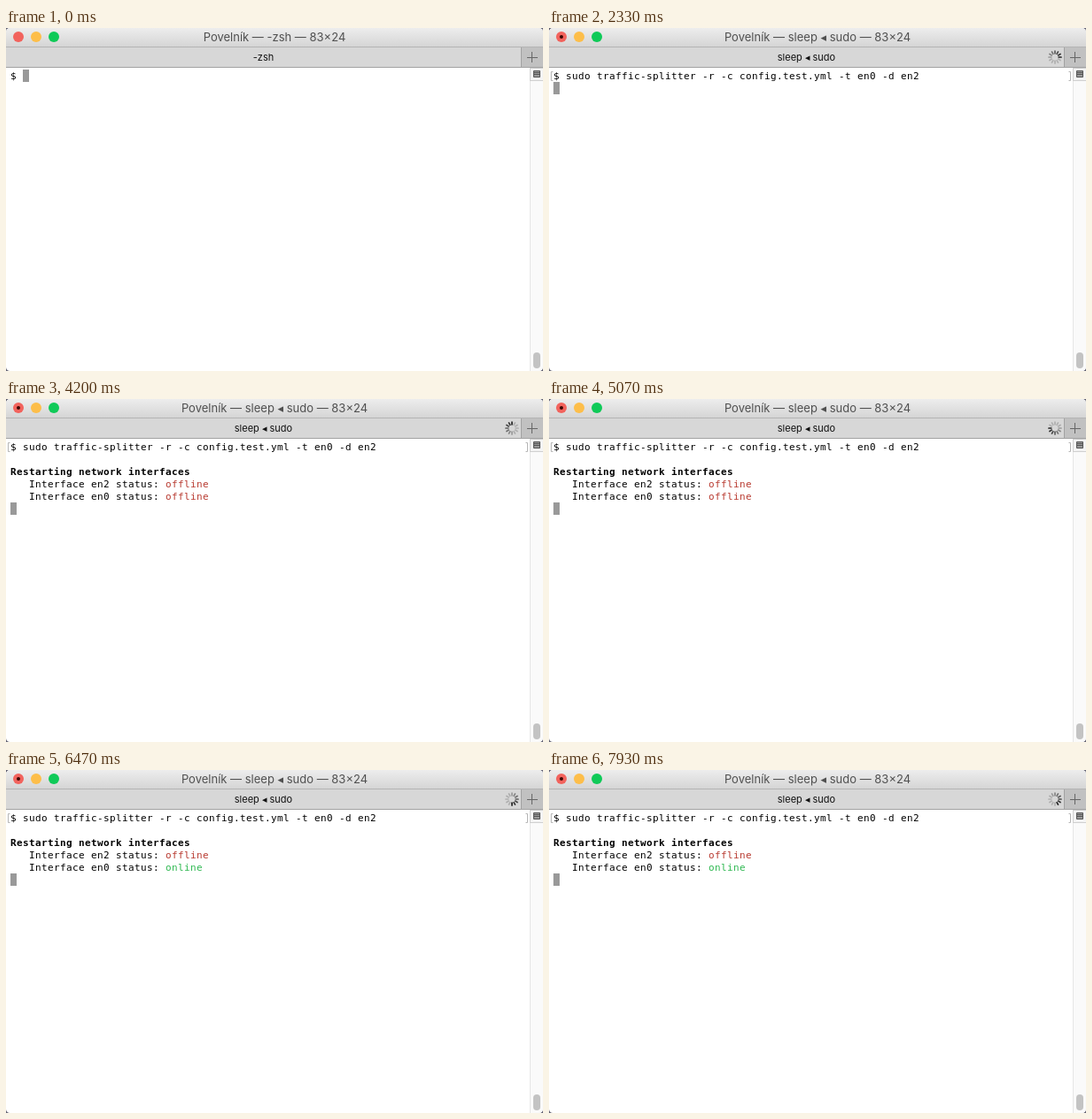
An HTML page for the animation above (8 s loop, 606 by 388 pixels).

```html
<!DOCTYPE html>
<html lang="cs">
<head>
<meta charset="utf-8">
<style>
  html, body { margin: 0; width: 100%; height: 100%; overflow: hidden; background: #667; }
  svg { display: block; }
  text { white-space: pre; }
  .ui { font-family: Inter, "DejaVu Sans", sans-serif; text-anchor: middle; }
  .term { font: 11px "DejaVu Sans Mono", monospace; letter-spacing: .378px; }
  .bold { font-weight: bold; }
</style>
</head>
<body>
<svg width="606" height="388" viewBox="0 0 606 388">
  <defs>
    <linearGradient id="bar" x2="0" y2="1">
      <stop stop-color="#ededed"/><stop offset="1" stop-color="#d4d4d4"/>
    </linearGradient>
    <clipPath id="window"><rect width="606" height="388" rx="4.5"/></clipPath>
  </defs>
  <g clip-path="url(#window)">
    <rect width="606" height="388" fill="#fff"/>

    <rect width="606" height="22" fill="url(#bar)"/>
    <rect y="21" width="606" height="1" fill="#b4b4b4"/>
    <circle cx="14" cy="10" r="6" fill="#f2635d"/>
    <circle cx="34" cy="10" r="6" fill="#fdbe4a"/>
    <circle cx="54" cy="10" r="6" fill="#0fca58"/>
    <circle id="busy" cx="14" cy="10" r="2" fill="#3c0805"/>
    <text id="title" class="ui" x="303" y="15" font-size="13" fill="#505050"></text>

    <rect y="22" width="606" height="22" fill="#d7d7d7"/>
    <rect x="581" y="22" width="25" height="22" fill="#c1c1c1"/>
    <path d="M581.5 22V44M0 44.5H606" stroke="#a2a2a2"/>
    <path d="M588 33.5H600M593.5 27V39" stroke="#666"/>
    <text id="tab" class="ui" x="290.5" y="37" font-size="11" fill="#111"></text>
    <g id="spinner" transform="translate(571 33)" stroke="#222" stroke-width="1.7" stroke-linecap="round"></g>

    <rect x="591" y="45" width="15" height="343" fill="#fafafa"/>
    <path d="M591.5 45V388" stroke="#e6e6e6"/>
    <rect x="591.5" y="45.5" width="15" height="14" fill="#f4f4f4" stroke="#cfcfcf"/>
    <path d="M595.5 48.5H602.5V55.5H595.5ZM595.5 50.5H602.5M595.5 52.5H602.5" fill="#999" stroke="#555"/>
    <rect x="595" y="367" width="8" height="18" rx="4" fill="#c3c3c3"/>

    <path id="marks" d="M4.5 49.5H2.5V59.5H4.5M586.5 49.5H588.5V59.5H586.5" fill="none" stroke="#b5b5b5"/>
    <rect id="cursor" width="7" height="14" fill="#999"/>
    <text class="term" x="5" y="58">$ <tspan id="command">sudo traffic-splitter -r -c config.test.yml -t en0 -d en2</tspan></text>
    <g id="output" class="term">
      <text class="bold" x="5" y="86">Restarting network interfaces</text>
      <text x="26" y="100">Interface en2 status: <tspan fill="#b83a30">offline</tspan></text>
      <text x="26" y="114">Interface en0 status: <tspan id="status"></tspan></text>
    </g>
  </g>
</svg>
<script>
const LOOP = 8000, SPOKES = 12, SPIN = 500;
const PASTE = 670, ENTER = 1730, SUDO = 1870, SLEEP = 2070, SPINNER = 2270, OUTPUT = 3430, ONLINE = 6400;
const $ = id => document.getElementById(id);
const show = (id, on) => $(id).setAttribute('visibility', on ? 'visible' : 'hidden');
const setText = (id, value) => { if ($(id).textContent !== value) $(id).textContent = value; };

for (let i = 0; i < SPOKES; i++) {
  const spoke = document.createElementNS('http://www.w3.org/2000/svg', 'path');
  spoke.setAttribute('d', 'M0 -4.2V-7');
  spoke.setAttribute('transform', `rotate(${i * 360 / SPOKES})`);
  $('spinner').append(spoke);
}

function placeCursor(column, row) {
  $('cursor').setAttribute('x', 5 + column * 7);
  $('cursor').setAttribute('y', 47 + row * 14);
}

function draw(t) {
  const process = t < SUDO ? '-zsh' : t < SLEEP ? 'sudo' : 'sleep ◂ sudo';
  setText('title', `Povelník — ${process} — 83×24`);
  setText('tab', process);
  show('busy', t >= SUDO);
  show('command', t >= PASTE);
  show('marks', t >= ENTER);
  show('output', t >= OUTPUT);
  show('spinner', t >= SPINNER);

  const online = t >= ONLINE;
  setText('status', online ? 'online' : 'offline');
  $('status').setAttribute('fill', online ? '#2fb851' : '#b83a30');

  if (t < PASTE) placeCursor(2, 0);
  else if (t < ENTER) placeCursor(59, 0);
  else placeCursor(0, t < OUTPUT ? 1 : 5);

  const head = Math.floor(t / SPIN * SPOKES + 7.5) % SPOKES;
  [...$('spinner').children].forEach((spoke, i) => {
    const age = (head - i + SPOKES) % SPOKES;
    spoke.setAttribute('stroke-opacity', Math.max(.22, 1 - age * .11));
  });
}

const start = performance.now();
function tick() {
  draw((performance.now() - start) % LOOP);
  requestAnimationFrame(tick);
}
tick();
</script>
</body>
</html>
```
